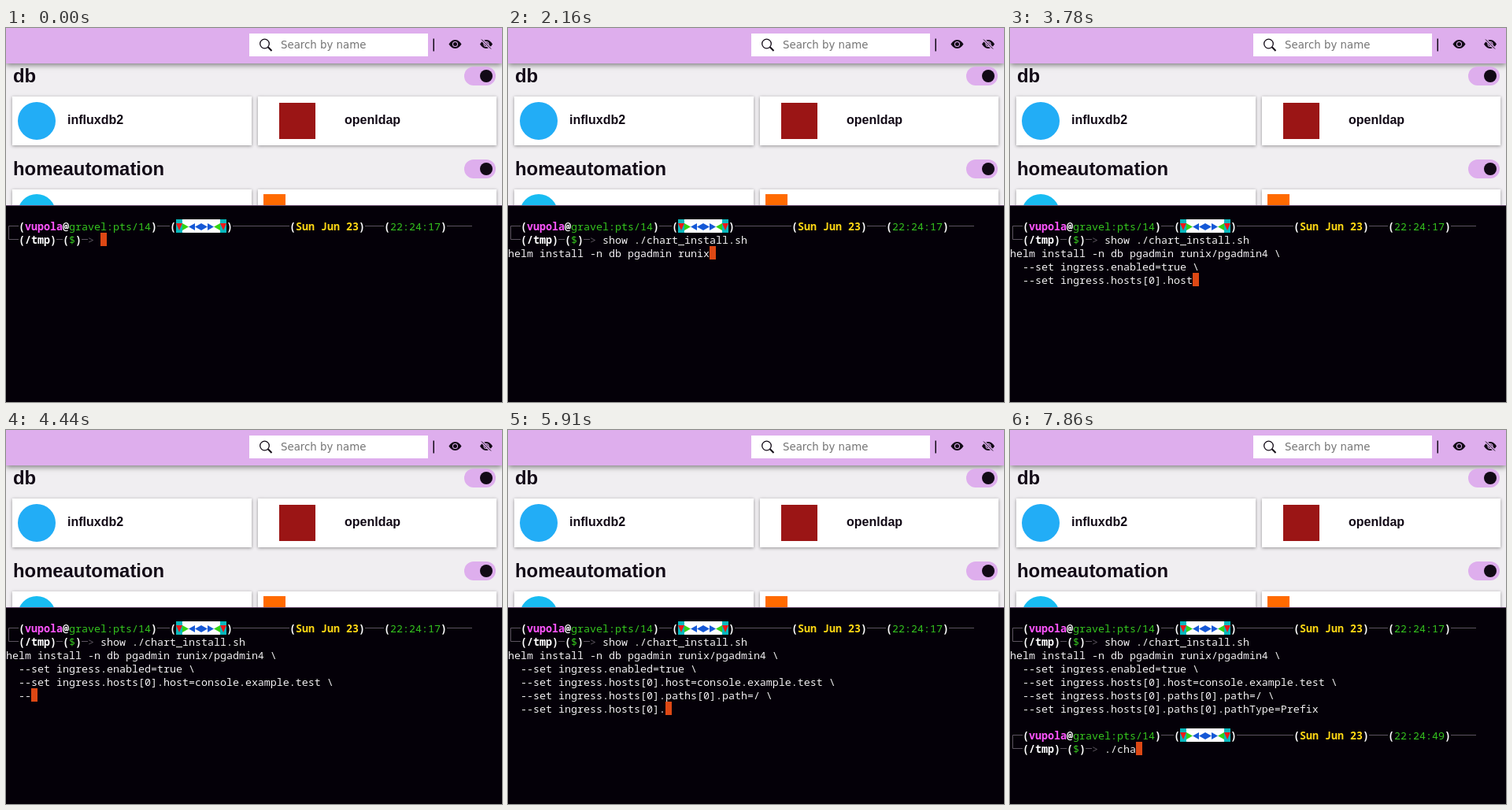
An HTML page with a canvas for the animation above (8 s loop, 630 by 475 pixels).

```html
<!DOCTYPE html>
<html lang="en">
<head>
<meta charset="utf-8">
<title>Chart install</title>
<style>
  html, body { margin: 0; width: 100%; height: 100%; overflow: hidden; background: #040008; }
  canvas { display: block; }
</style>
</head>
<body>
<canvas id="stage" width="630" height="475"></canvas>
<script>
const ctx = document.getElementById('stage').getContext('2d');
const LOOP = 8000;
const CELL = 8, ROW = 17, TOP = 243;
const LILAC = '#deaeed', INK = '#120a16', WHITE = '#ffffff';
const GREY = '#5c545f', GREEN = '#35c41e', PINK = '#ff55ff', YELLOW = '#ffd814';
const SANS = '"Liberation Sans", Arial, sans-serif';
const MONO = '13.3333px "Noto Sans Mono", "DejaVu Sans Mono", monospace';

const COMMAND = 'show ./chart_install.sh ';
const KEYS = [240, 330, 420, 480, 690, 870, 930, 1080, 1170, 1260];
const COMPLETE = 1350;
const RETRY = './cha';
const RETRY_KEYS = [7440, 7530, 7620, 7770, 7860];
const SCRIPT = [
  'helm install -n db pgadmin runix/pgadmin4 \\',
  '  --set ingress.enabled=true \\',
  '  --set ingress.hosts[0].host=console.example.test \\',
  '  --set ingress.hosts[0].paths[0].path=/ \\',
  '  --set ingress.hosts[0].paths[0].pathType=Prefix'
].join('\n');

// Output arrives four characters at a time, in bursts of nine.
const OUTPUT = 1530, BURST = 1680, BURST_GAP = 810, CHUNK = 4;
const BEATS = [0, 90, 180, 240, 330, 420, 480, 570, 660];
const DONE = 6540, PROMPT = 6570;

const passed = (times, t) => times.filter(at => at <= t).length;

function box(x, y, w, h, fill) {
  ctx.fillStyle = fill;
  ctx.fillRect(x, y, w, h);
}

function disc(x, y, r, fill) {
  ctx.fillStyle = fill;
  ctx.beginPath();
  ctx.arc(x, y, r, 0, Math.PI * 2);
  ctx.fill();
}

function label(text, x, y, font, fill) {
  ctx.font = font;
  ctx.fillStyle = fill;
  ctx.fillText(text, x, y);
}

function stroke(points, color, width) {
  ctx.strokeStyle = color;
  ctx.lineWidth = width;
  ctx.beginPath();
  points.forEach(([x, y]) => ctx.lineTo(x, y));
  ctx.stroke();
}

function shape(points, fill) {
  ctx.fillStyle = fill;
  ctx.beginPath();
  points.forEach(([x, y]) => ctx.lineTo(x, y));
  ctx.fill();
}

function shadowed(blur, dy, alpha, draw) {
  ctx.save();
  ctx.shadowColor = `rgba(0, 0, 0, ${alpha})`;
  ctx.shadowBlur = blur;
  ctx.shadowOffsetY = dy;
  draw();
  ctx.restore();
}

function card(x, y, w) {
  shadowed(4, 1, 0.4, () => box(x, y, w, 62, WHITE));
}

function section(title, y) {
  label(title, 9, y + 8, `bold 23.85px ${SANS}`, INK);
  ctx.fillStyle = LILAC;
  ctx.beginPath();
  ctx.roundRect(582, y - 12, 40, 24, 12);
  ctx.fill();
  disc(610, y, 8, INK);
}

function eye(x, slashed) {
  ctx.save();
  ctx.translate(x, 12.5);
  ctx.fillStyle = INK;
  ctx.fill(new Path2D('M0 8s3-5.5 8-5.5S16 8 16 8s-3 5.5-8 5.5S0 8 0 8z'));
  disc(8, 8, 3.5, LILAC);
  disc(8, 8, 2.5, INK);
  if (slashed) {
    stroke([[1, 1], [15, 15]], LILAC, 3.4);
    stroke([[2, 2], [14, 14]], INK, 1);
  }
  ctx.restore();
}

function page() {
  box(0, 0, 630, 225, '#f0eef1');
  shadowed(7, 2, 0.5, () => box(0, 0, 630, 45, LILAC));
  box(309, 7, 227, 29, WHITE);
  ctx.strokeStyle = INK;
  ctx.lineWidth = 1.3;
  ctx.beginPath();
  ctx.arc(328.5, 20, 5.8, 0, Math.PI * 2);
  ctx.stroke();
  stroke([[332.8, 24.3], [337.5, 29]], INK, 2);
  label('Search by name', 349, 26, '13.3333px "DejaVu Sans", sans-serif', '#757575');
  box(542.5, 13.5, 1.5, 16, INK);
  eye(562.5, false);
  eye(602, true);

  section('db', 61);
  card(8, 87, 304);
  card(320, 87, 303);
  disc(39, 118, 24, '#22adf6');
  box(347, 95, 46, 46, '#9b1515');
  label('influxdb2', 78, 122, `bold 16px ${SANS}`, INK);
  label('openldap', 430, 122, `bold 16px ${SANS}`, INK);

  section('homeautomation', 179);
  card(8, 205, 304);
  card(320, 205, 303);
  disc(39, 235, 24, '#18bcf2');
  box(327, 211, 28, 28, '#ff6a00');
}

function cells(text, col, row, color = '#f2f0f2', bold = false) {
  label(text, col * CELL, TOP + row * ROW + 14, (bold ? 'bold ' : '') + MONO, color);
}

function rule(from, to, row) {
  box(from * CELL, TOP + row * ROW + 8, (to - from) * CELL, 1, GREY);
}

function arrow(col, y, dir, color) {
  const back = col * CELL + (dir > 0 ? 0 : CELL);
  shape([[back, y + 5], [back + dir * CELL, y + 9.5], [back, y + 14]], color);
}

function badge(row) {
  const y = TOP + row * ROW, blue = '#1558d6', green = '#32d414';
  box(216, y, 64, ROW, WHITE);
  for (const x of [216, 272]) {
    box(x, y, CELL, ROW, '#08b8bd');
    shape([[x, y + 5], [x + 8, y + 5], [x + 4, y + 14]], '#f01818');
  }
  arrow(28, y, 1, green);
  arrow(29, y, -1, blue);
  arrow(30, y, -1, blue);
  arrow(31, y, 1, blue);
  arrow(32, y, 1, blue);
  arrow(33, y, -1, green);
}

function prompt(row, clock) {
  const mid = TOP + row * ROW + 8.5;
  stroke([[16, mid], [3.5, mid], [3.5, mid + ROW], [16, mid + ROW]], GREY, 1);
  [[24, 26], [36, 45], [57, 60], [70, 74]].forEach(([a, b]) => rule(a, b, row));
  [2, 26, 45, 60].forEach(col => cells('(', col, row, WHITE, true));
  [23, 35, 56, 69].forEach(col => cells(')', col, row, WHITE, true));
  cells('vupola', 3, row, PINK, true);
  cells('@', 9, row, WHITE, true);
  cells('gravel:pts/14', 10, row, GREEN);
  badge(row);
  cells('Sun Jun 23', 46, row, YELLOW, true);
  cells(clock, 61, row, GREEN);

  cells('(/tmp)', 2, row + 1, WHITE, true);
  rule(8, 9, row + 1);
  cells('(', 9, row + 1, WHITE, true);
  cells('$', 10, row + 1, GREEN);
  cells(')', 11, row + 1, WHITE, true);
  rule(12, 13, row + 1);
  cells('>', 13, row + 1, GREY);
}

function cursor(col, row) {
  box(col * CELL, TOP + row * ROW, CELL, ROW, '#dd4814');
}

function outputLength(t) {
  if (t < BURST) return CHUNK;
  const burst = Math.floor((t - BURST) / BURST_GAP);
  const beat = passed(BEATS, (t - BURST) % BURST_GAP);
  return CHUNK * (1 + burst * BEATS.length + beat);
}

function terminal(t) {
  box(0, 225, 630, 250, '#040008');
  box(0, 225, 630, 1, '#694a70');
  prompt(0, '22:24:17');
  const typed = t < COMPLETE ? COMMAND.slice(0, passed(KEYS, t)) : COMMAND;
  cells(typed, 15, 1);
  if (t < OUTPUT) return cursor(15 + typed.length, 1);

  const lines = SCRIPT.slice(0, t < DONE ? outputLength(t) : SCRIPT.length).split('\n');
  lines.forEach((line, i) => cells(line, 0, 2 + i));
  if (t < DONE) return cursor(lines.at(-1).length, 1 + lines.length);
  if (t < PROMPT) return cursor(0, 7);

  prompt(8, '22:24:49');
  const retry = RETRY.slice(0, passed(RETRY_KEYS, t));
  cells(retry, 15, 9);
  cursor(15 + retry.length, 9);
}

function frame() {
  page();
  terminal(performance.now() % LOOP);
  requestAnimationFrame(frame);
}
frame();
</script>
</body>
</html>
```
